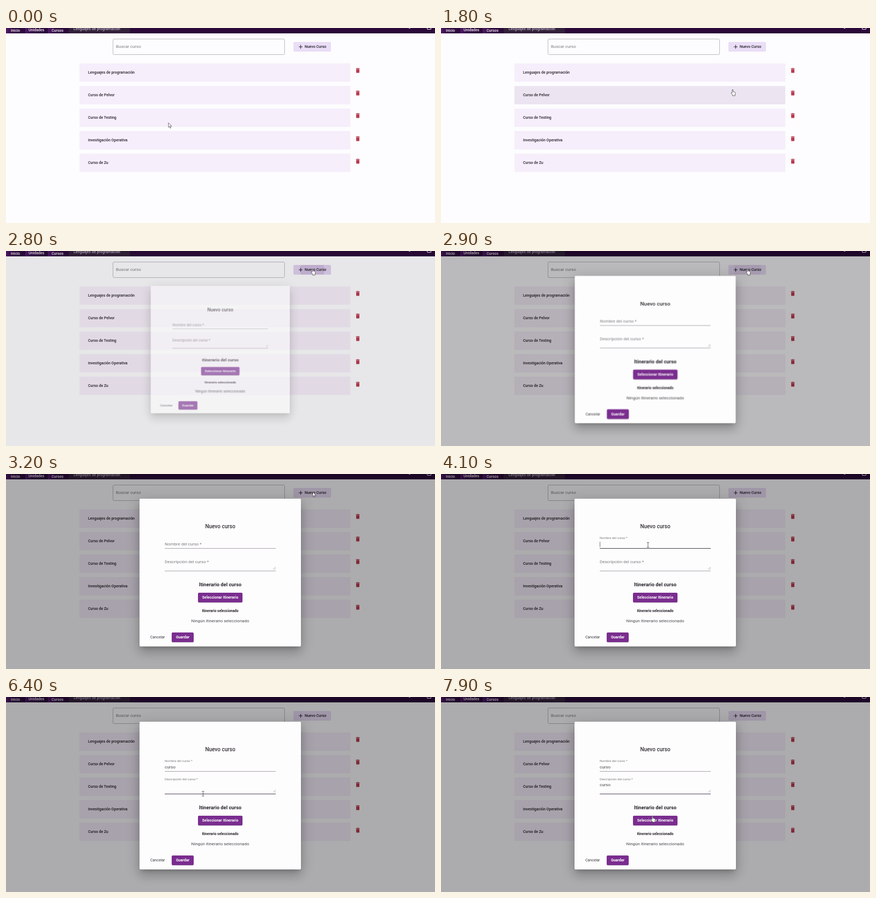
Recreate the animation shown at these times as an HTML page. Size 800 by 363 pixels, loop 8000 ms.

```html
<!DOCTYPE html>
<html lang="es">
<head>
<meta charset="utf-8">
<title>Nuevo curso</title>
<style>
html, body { margin: 0; width: 100%; height: 100%; overflow: hidden; background: #fdfcfe; }
#stage {
  position: relative; width: 800px; height: 363px; overflow: hidden;
  font: 500 7px/10px Roboto, Arial, sans-serif; color: #26222a; background: #fdfcfe;
}
#stage div, #stage svg { position: absolute; box-sizing: border-box; }
/* Text is placed by the middle of its capitals. */
.t { margin-top: -5px; white-space: nowrap; font-weight: 400; }
.mid { left: 249px; width: 301px; text-align: center; }
.anim, .anim::before, .anim::after {
  animation-duration: 8s; animation-delay: -10ms;
  animation-iteration-count: infinite; animation-timing-function: step-end;
}

/* Header */
#bar { left: 0; top: 0; width: 800px; height: 10px; background: #2b0a39; overflow: hidden; }
#bar .t { color: #f3edf6; font-weight: 500; }
.tab { top: 0; width: 35px; height: 10px; background: linear-gradient(90deg, #521a6c, #38104a 25%, #2b0a39); }
#bar .open { left: 117px; width: 114px; height: 10px; background: #33203b; }

/* Page */
#search { left: 199px; top: 20px; width: 321px; height: 30.4px; border: 1px solid #bcbabd; border-radius: 3px; }
#add { left: 536px; top: 26px; width: 70px; height: 18px; border-radius: 2px; background: #eaddf6; overflow: hidden; animation-name: addHover; }
#add i { position: absolute; left: 12px; top: -14px; width: 46px; height: 46px; border-radius: 50%; background: #5b2a7a; opacity: 0; animation-name: ripple; }
.row { left: 137px; top: calc(66px + var(--i) * 42.1px); width: 504.5px; height: 34px; padding-left: 16px; line-height: 34px; background: #f6eefb; }
.row svg { left: 512.5px; top: 7.3px; width: 12px; height: 12px; fill: #b93c52; }
#r0 { animation-name: hover0; }
#r1 { animation-name: hover1; }
#r2 { animation-name: hover2; }
#shade { inset: 0; background: #000; opacity: 0; animation-name: shade; }

/* Dialog */
#dialog { inset: 0; opacity: 0; transform-origin: 399.5px 183.5px; animation-name: dialog; }
#card { left: 249px; top: 46px; width: 300.5px; height: 275px; border-radius: 2px; background: #fefdfe; box-shadow: 0 5px 8px -3px #0003, 0 12px 19px 1px #0002, 0 4px 23px 4px #0002; }
.label { left: 296px; font-size: 8px; color: #7b797c; transform-origin: 0 50%; }
.line { left: 296px; width: 207px; height: 1px; background: #a5a2a6; }
.value { left: 296px; font-size: 8px; color: #444246; height: 10px; }
.value::after { content: ""; display: inline-block; height: 10px; border-left: 1px solid #77727a; vertical-align: top; visibility: hidden; }
.btn { border-radius: 2px; background: #7a2d8f; color: #fff; height: 18px; line-height: 18px; text-align: center; box-shadow: 0 1px 1px #0003; font-weight: 700; }
#nameLabel { animation-name: nameFloat; }
#nameLine { animation-name: nameLine; }
#name::before { content: ""; animation-name: typeName; }
#name::after { animation-name: nameCaret; }
#descLabel { animation-name: descFloat; }
#descLine { animation-name: descLine; }
#desc::before { content: ""; animation-name: typeDesc; }
#desc::after { animation-name: descCaret; }

/* Pointer */
#pointer { left: 0; top: 0; animation: move 8s -10ms infinite linear; }
#pointer svg { overflow: visible; width: 1px; height: 1px; stroke-linejoin: round; visibility: hidden; }
#arrow { animation-name: arrow; }
#hand { animation-name: hand; }
#beam { animation-name: beam; }

@keyframes move {
  0%, 3.75% { transform: translate(303px, 176.5px); }
  21.25%, 23.75% { transform: translate(544px, 115px); }
  31.25%, 41.25% { transform: translate(572px, 33.5px); animation-timing-function: ease-in-out; }
  48.75%, 70% { transform: translate(386px, 132px); animation-timing-function: ease-in-out; }
  73.75%, 91.25% { transform: translate(367.5px, 180px); animation-timing-function: ease-in-out; }
  97.5%, 100% { transform: translate(394.5px, 222px); }
}
@keyframes arrow {
  0% { visibility: visible; } 3.75% { visibility: hidden; }
  11.25% { visibility: visible; } 13.75% { visibility: hidden; }
  28.75% { visibility: visible; } 30% { visibility: hidden; }
  40% { visibility: visible; } 47.5% { visibility: hidden; }
  93.75% { visibility: visible; } 96.25%, 100% { visibility: hidden; }
}
@keyframes hand {
  0% { visibility: hidden; }
  3.75% { visibility: visible; } 11.25% { visibility: hidden; }
  13.75% { visibility: visible; } 28.75% { visibility: hidden; }
  30% { visibility: visible; } 40% { visibility: hidden; }
  96.25%, 100% { visibility: visible; }
}
@keyframes beam {
  0% { visibility: hidden; }
  47.5% { visibility: visible; } 93.75%, 100% { visibility: hidden; }
}
@keyframes hover2 { 3.75% { background: #ece4f0; } 11.25% { background: #f6eefb; } }
@keyframes hover1 { 13.75% { background: #ece4f0; } 25% { background: #f6eefb; } }
@keyframes hover0 { 25% { background: #ece4f0; } 28.75% { background: #f6eefb; } }
@keyframes addHover { 30% { background: #e0d1ee; } 36.25% { background: #eaddf6; } }
@keyframes ripple {
  0% { opacity: 0; transform: scale(.3); }
  33.75% { opacity: .12; transform: scale(.6); }
  35% { opacity: .12; transform: none; }
  36.25% { opacity: .06; transform: scale(1.1); }
  37.5%, 100% { opacity: 0; }
}
@keyframes shade {
  0% { opacity: 0; } 35% { opacity: .085; } 36.25% { opacity: .265; } 37.5%, 100% { opacity: .32; }
}
@keyframes dialog {
  0% { opacity: 0; transform: scale(.7); }
  35% { opacity: .6; transform: scale(.862); }
  36.25% { opacity: 1; transform: scale(.997); }
  37.5%, 100% { opacity: 1; transform: none; }
}
@keyframes nameFloat { 0% { transform: none; } 50%, 100% { transform: translateY(-11.5px) scale(.75); } }
@keyframes descFloat { 0% { transform: none; } 73.75%, 100% { transform: translateY(-11px) scale(.75); } }
@keyframes nameLine { 50% { background: #3f3c42; } 73.75% { background: #a5a2a6; } }
@keyframes descLine { 0% { background: #a5a2a6; } 73.75%, 100% { background: #4c4156; } }
@keyframes typeName {
  0% { content: ""; } 58.75% { content: "c"; } 61.25% { content: "cu"; }
  62.5% { content: "cur"; } 65% { content: "curs"; } 66.25%, 100% { content: "curso"; }
}
@keyframes typeDesc {
  0% { content: ""; } 82.5% { content: "c"; } 83.75% { content: "cu"; }
  86.25% { content: "cur"; } 87.5% { content: "curs"; } 90%, 100% { content: "curso"; }
}
@keyframes nameCaret {
  0% { visibility: hidden; } 50% { visibility: visible; } 56.25% { visibility: hidden; }
  58.75% { visibility: visible; } 72.5%, 100% { visibility: hidden; }
}
@keyframes descCaret {
  0% { visibility: hidden; } 73.75% { visibility: visible; } 80% { visibility: hidden; }
  82.5% { visibility: visible; } 96.25%, 100% { visibility: hidden; }
}
</style>
</head>
<body>
<svg width="0" height="0" style="position:absolute">
  <symbol id="bin" viewBox="0 0 24 24"><path d="M6 19c0 1.1.9 2 2 2h8c1.1 0 2-.9 2-2V7H6zM19 4h-3.5l-1-1h-5l-1 1H5v2h14z"/></symbol>
</svg>
<div id="stage">
  <div id="bar">
    <div class="tab" style="left:0"></div>
    <div class="tab" style="left:36px"></div>
    <div class="tab" style="left:78px"></div>
    <div class="open"></div>
    <div class="t" style="left:9px;top:4.5px">Inicio</div>
    <div class="t" style="left:42px;top:3.5px">Unidades</div>
    <div class="t" style="left:85px;top:4.5px">Cursos</div>
    <div class="t" style="left:126px;top:2px;color:#b9afbf">Lenguajes de programación</div>
    <div style="left:751px;top:0;width:3px;height:1px;background:#d9cfe0"></div>
    <div style="left:785px;top:-4px;width:8px;height:7px;border:1px solid #eee6f2;border-radius:1px"></div>
  </div>

  <div id="search"></div>
  <div class="t" style="left:205px;top:35px;font-size:8px;color:#7d7b7f">Buscar curso</div>
  <div id="add" class="anim"><i class="anim"></i></div>
  <svg style="left:546px;top:31px" width="8" height="8"><path d="M0 4h7M3.5.5v7" stroke="#26222a"/></svg>
  <div class="t" style="left:557px;top:35px;font-weight:500">Nuevo Curso</div>

  <div id="r0" class="row anim" style="--i:0">Lenguajes de programación<svg><use href="#bin"/></svg></div>
  <div id="r1" class="row anim" style="--i:1">Curso de Pelvor<svg><use href="#bin"/></svg></div>
  <div id="r2" class="row anim" style="--i:2">Curso de Testing<svg><use href="#bin"/></svg></div>
  <div class="row" style="--i:3">Investigación Operativa<svg><use href="#bin"/></svg></div>
  <div class="row" style="--i:4">Curso de Zu<svg><use href="#bin"/></svg></div>

  <div id="shade" class="anim"></div>

  <div id="dialog" class="anim">
    <div id="card"></div>
    <div class="t mid" style="top:98px;font-size:10px;font-weight:500;color:#343136">Nuevo curso</div>
    <div id="nameLabel" class="t label anim" style="top:131px">Nombre del curso *</div>
    <div id="name" class="t value anim" style="top:131px"></div>
    <div id="nameLine" class="line anim" style="top:138px"></div>
    <div id="descLabel" class="t label anim" style="top:163.5px">Descripción del curso *</div>
    <div id="desc" class="t value anim" style="top:163.5px"></div>
    <div id="descLine" class="line anim" style="top:180px"></div>
    <svg style="left:498px;top:173px" width="5" height="5"><path d="M0 5 5 0M3 5 5 3" stroke="#8a878c" stroke-width=".7"/></svg>
    <div class="t mid" style="top:206px;font-size:9.36px;font-weight:700">Itinerario del curso</div>
    <div class="btn" style="left:358px;top:221px;width:83px">Seleccionar Itinerario</div>
    <div class="t mid" style="top:254.5px;font-size:6.64px;font-weight:700">Itinerario seleccionado</div>
    <div class="t mid" style="top:274px;font-size:8px;color:#4a484c">Ningún itinerario seleccionado</div>
    <div class="t" style="left:269px;top:303.5px;color:#3a373d">Cancelar</div>
    <div class="btn" style="left:309px;top:295px;width:41px">Guardar</div>
  </div>

  <div id="pointer">
    <svg id="arrow" class="anim"><path d="M0 0v8.5l2-1.8 1.3 2.9 1.3-.6-1.3-2.8H6z" fill="#fff" stroke="#333" stroke-width=".7"/></svg>
    <svg id="hand" class="anim"><path d="M-1 0q1-1 1.7 0v3.6l3.6.9q.9.4.7 1.4L4.4 9v2H-.4V9.4L-3 6.2q0-1.2 1.2-.8L-1 6z" fill="#fff" stroke="#333" stroke-width=".7"/></svg>
    <svg id="beam" class="anim"><path d="M-2-4.5h1.4L0-4l.6-.5H2M0-4v8M-2 4.5h1.4L0 4l.6.5H2" fill="none" stroke="#333" stroke-width=".8"/></svg>
  </div>
</div>
</body>
</html>
```
